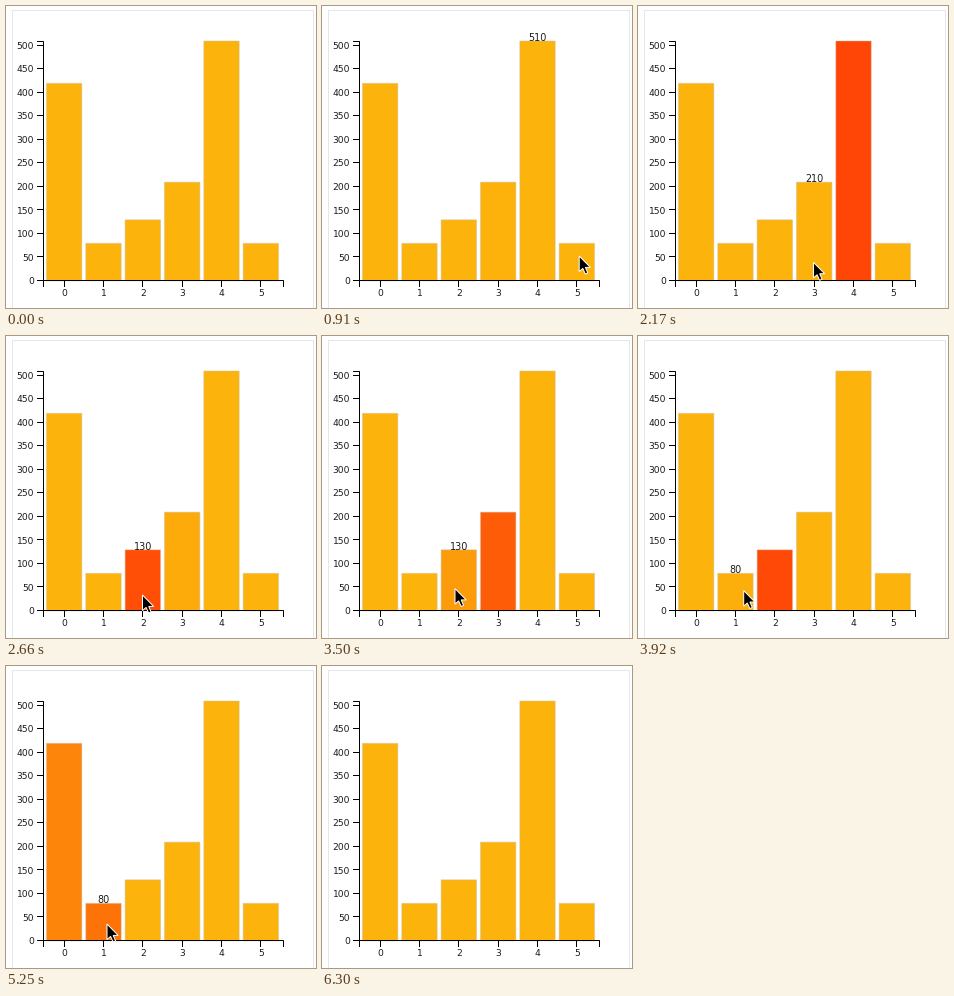
These frames come from a looping animation (310x302 px, 6.93 s). A matplotlib script:

```python
import matplotlib.pyplot as plt
import numpy as np
from matplotlib.animation import FuncAnimation
from matplotlib.patches import Polygon, Rectangle

W, H, DPI = 310, 302, 100
PX = 72 / DPI                      # one pixel in points
STEP_MS, FRAMES = 70, 99
LABEL_LAG, FADE_LAG, FADE_MS = 60, 100, 350

VALUES = [420, 80, 130, 210, 510, 80]
LEFT, BASE, SPAN = 36.5, 275, 240
BAND = SPAN / 6.1
BAR_W = BAND * 0.9
REST = np.array([252, 179, 11]) / 255
HOT = np.array([255, 69, 6]) / 255

# pointer turning points: ms, x, y
PATH = np.array([
    (630, 292, 242), (750, 150, 250), (950, 284, 250), (1200, 235, 252),
    (1470, 226, 252), (1820, 226, 252), (2305, 156, 258), (2660, 136.5, 259),
    (2940, 190, 257), (3500, 133, 252.5), (4400, 74.5, 257),
    (4550, 71, 257), (4880, 71, 257), (5250, 101, 258), (5600, 134, 266),
])
ARROW = np.array([
    (0, 0), (0, 15.6), (3.6, 12.4), (6.1, 18), (8.6, 16.9), (6.2, 11.4),
    (11.2, 11.4),
])


def tip(t):
    return [np.interp(t, PATH[:, 0], PATH[:, k]) for k in (1, 2)]


def on_stage(t):
    return PATH[0, 0] <= t <= PATH[-1, 0]


def hovered(t):
    """Index of the bar under the pointer, or None."""
    i = int((tip(t)[0] - LEFT - BAND * 0.05) // BAND)
    return i if on_stage(t) and i < len(VALUES) else None


def find_switches():
    found = [(0, None)]
    for t in range(0, FRAMES * STEP_MS, 5):
        bar = hovered(t - FADE_LAG)
        if bar != found[-1][1]:
            found.append((t, bar))
    return found


SWITCHES = find_switches()


def ease(u):
    u = min(max(u, 0), 1)
    return 4 * u ** 3 if u < 0.5 else 1 - 4 * (1 - u) ** 3


def heat(bar, t):
    """Highlight level of a bar; a new fade starts from the current level."""
    origin, goal, begun = 0, 0, 0

    def level(now):
        return origin + (goal - origin) * ease((now - begun) / FADE_MS)

    for start, b in SWITCHES:
        if start > t:
            break
        if (b == bar) != goal:
            origin, goal, begun = level(start), int(b == bar), start
    return level(t)


def y_of(value):
    return BASE - value * SPAN / max(VALUES)


def center(i):
    return LEFT + BAND * (i + 0.1) + BAR_W / 2


fig = plt.figure(figsize=(W / DPI, H / DPI), dpi=DPI, facecolor="white")
ax = fig.add_axes([0, 0, 1, 1])
ax.set(xlim=(0, W), ylim=(H, 0))
ax.axis("off")


def line(xs, ys, color="black"):
    """Crisp one-pixel line through whole pixel columns and rows."""
    ax.plot(np.floor(xs) + 0.5, np.floor(ys) + 0.5, color=color, lw=PX,
            solid_capstyle="projecting", solid_joinstyle="miter",
            snap=False, zorder=3)


def text(x, y, s, size, ha="center"):
    return ax.text(x, y, s, size=size * PX, family="DejaVu Sans",
                   color="#1a1a1a", ha=ha, va="baseline", zorder=4)


# panel border
line([6, 6, 307, 307], [H, 4, 4, H], "#e6e6e6")

bars = []
for i, v in enumerate(VALUES):
    bar = Rectangle((center(i) - BAR_W / 2, y_of(v)), BAR_W, BASE - y_of(v),
                    facecolor=REST, edgecolor=(0.8, 0.75, 0.65, 0.45),
                    lw=PX, snap=False, zorder=2)
    bars.append(ax.add_patch(bar))

# axes with outer ticks
line([31, 37, 37, 31], [35, 35, 274, 274])
line([37, 37, 277, 277], [280, 274, 274, 280])
for v in range(0, 501, 50):
    y = y_of(v) - 0.5
    line([31, 37], [y, y])
    text(28, y + 3.6, str(v), 9.2, "right")
for i in range(len(VALUES)):
    x = center(i)
    line([x, x], [274, 280])
    text(x, 290.4, str(i), 9.2)

label = text(0, 0, "", 9.6)
pointer = ax.add_patch(Polygon(ARROW, closed=True, facecolor="black",
                               edgecolor="white", lw=PX, zorder=6))


def draw(frame):
    t = frame * STEP_MS
    for i, bar in enumerate(bars):
        bar.set_facecolor(REST + (HOT - REST) * heat(i, t))

    on = hovered(t - LABEL_LAG)
    label.set_visible(on is not None)
    if on is not None:
        label.set_text(str(VALUES[on]))
        label.set_position((center(on), y_of(VALUES[on])))

    pointer.set_visible(on_stage(t))
    pointer.set_xy(ARROW + tip(t))
    return [*bars, label, pointer]


anim = FuncAnimation(fig, draw, frames=FRAMES, interval=STEP_MS,
                     init_func=lambda: draw(0), repeat=True, repeat_delay=0)
plt.show()
```
